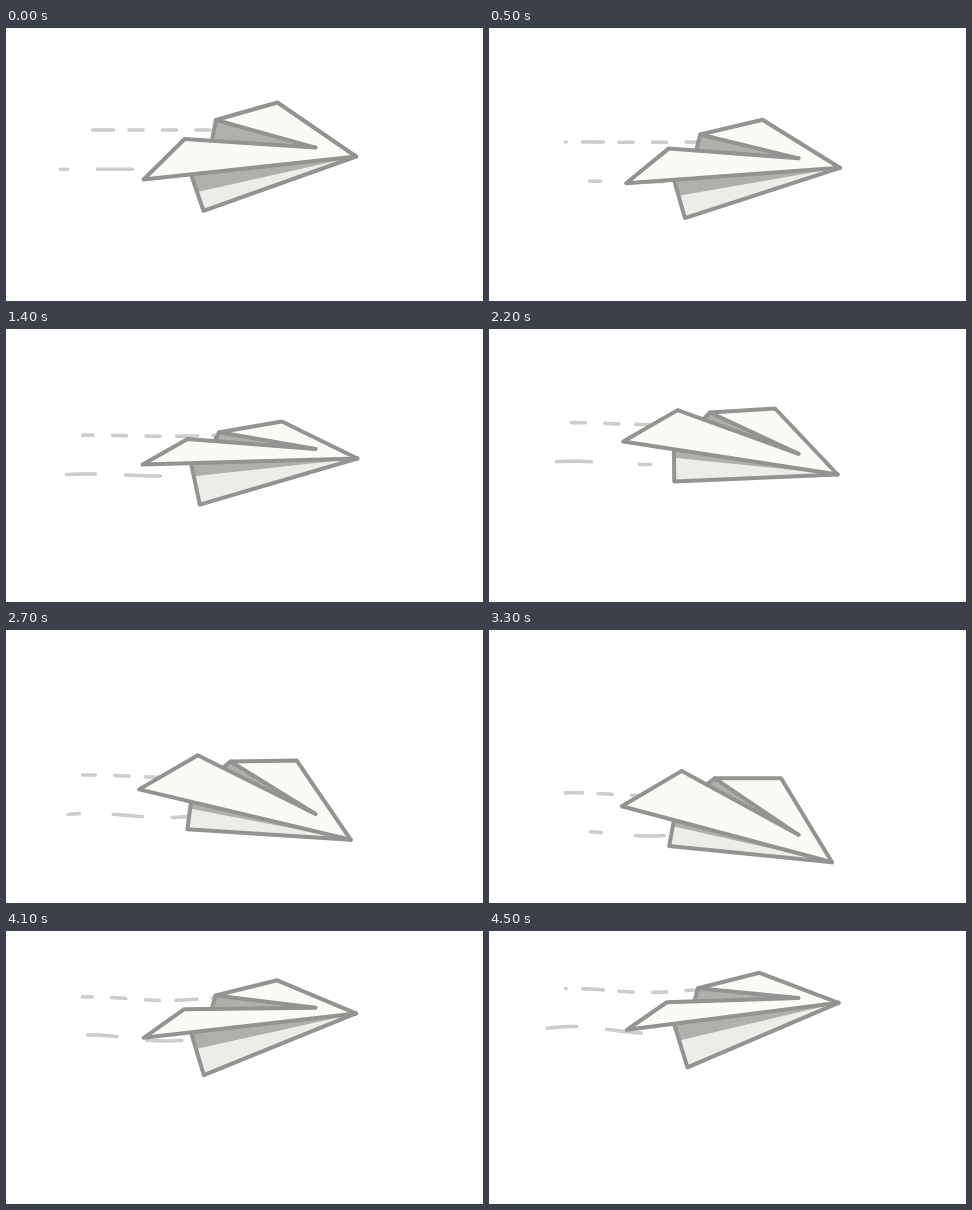
Recreate the animation shown at these times as an HTML page with a canvas. Size 477x273 px, loop 4600 ms.

```html
<!DOCTYPE html>
<html lang="en">
<head>
<meta charset="utf-8">
<title>Paper plane</title>
<style>
html, body { margin: 0; width: 100%; height: 100%; overflow: hidden; background: #fff; }
canvas { display: block; }
</style>
</head>
<body>
<canvas id="stage" width="477" height="273"></canvas>
<script>
const ctx = document.getElementById('stage').getContext('2d');
const LOOP = 4600, STEP = 100;
const PAPER = '#f9fbf6', KEEL = '#ebede9', SHADE = '#adb0ab', INK = '#939391', TRAIL = '#cdcdcc';

// time, nose height, tail and far wing relative to the nose, distance flown
const keys = [
  [0, 128.5, 23, -54, 0],
  [1000, 142.7, 9, -42, 519],
  [1400, 129.5, 6, -37, 720],
  [2000, 131.5, -23, -59, 1040],
  [2200, 145.5, -33, -66, 1146],
  [3100, 240, -56, -84, 1645],
  [3300, 232.2, -56, -84, 1756],
  [3700, 160.5, -1, -57, 1984],
  [4200, 71.8, 27, -30, 2247],
  [4500, 71.8, 27, -30, 2405]
];

const rate = (i, n) => (keys[i + 1][n] - keys[i][n]) / (keys[i + 1][0] - keys[i][0]);

function slope(i, n) {
  if (i === 0) return rate(0, n);
  if (i === keys.length - 1) return rate(i - 1, n);
  const h0 = keys[i][0] - keys[i - 1][0], h1 = keys[i + 1][0] - keys[i][0];
  return (rate(i - 1, n) * h1 + rate(i, n) * h0) / (h0 + h1);
}

// smooth curve through the keys
function poseAt(t) {
  let i = 0;
  while (i < keys.length - 2 && keys[i + 1][0] <= t) i++;
  const a = keys[i], b = keys[i + 1], h = b[0] - a[0], u = (t - a[0]) / h;
  const s = u * u * (3 - 2 * u);
  return a.map((y, n) => y + (b[n] - y) * s
    + h * u * (1 - u) * ((1 - u) * slope(i, n) - u * slope(i + 1, n)));
}

function trace(pts) {
  ctx.beginPath();
  pts.forEach(([x, y]) => ctx.lineTo(x, y));
}
function fill(color, ...pts) {
  trace(pts);
  ctx.fillStyle = color;
  ctx.fill();
}
function line(...pts) {
  trace(pts);
  ctx.stroke();
}

// point on the line p-q at a given x
const onLine = (p, q, x) => [x, p[1] + (q[1] - p[1]) * (x - p[0]) / (q[0] - p[0])];

function streak(x, len, left, height) {
  const a = Math.max(x, left) + 1.5, b = Math.min(x + len, 215) - 1.5;
  if (b <= a) return;
  const pts = [];
  for (let p = a; p < b; p += 4) pts.push([p, height(p)]);
  line(...pts, [b, height(b)]);
}

// repeats the [start, length] dashes every span pixels
function dashes(dashList, span, shift, left, height) {
  for (let x = (shift % span) - span; x < 215; x += span) {
    dashList.forEach(([start, len]) => streak(x + start, len, left, height));
  }
}

const upper = [0, 1, 2, 3].map(i => i ? [33.5 * i + 3, 17] : [0, 24]);
const lower = [[0, 38], [83, 14], [128, 32]];

function drawTrail(t, nose, tail, wing, flown) {
  ctx.strokeStyle = TRAIL;
  ctx.lineWidth = 3.6;
  const y = nose + 0.32 * tail + 0.54 * wing - 4.7;
  const wave = x => 2 * t / LOOP * Math.sin((x - 122) / 76 * Math.PI);
  dashes(upper, 134, 85 - flown + 134 * 20, 75, x => y + wave(x));
  dashes(lower, 187, 90 - flown + 187 * 20, 53, x => y + 39.3 + wave(x) * 1.7);
}

function drawPlane(nose, tail, wing) {
  // each corner shifts with the pitch of the tail and the far wing
  const corner = (x, swing, byTail, byWing, y) =>
    [x + swing * tail, nose + byTail * tail + byWing * wing + y];
  const tip = corner(136.2, 0.06, 1, 0, 0);
  const fold = corner(182.7, -0.18, 0.71, 0.59, -2);
  const end = corner(309.5, 0, 0.18, 0.14, -5.5);
  const farFold = corner(214.4, -0.2, 0.27, 0.87, 4.3);
  const farTip = corner(277.5, -0.26, 0, 1, 0);
  const keel = corner(192.5, 0.22, 0.78, 0.3, 52.6);
  const front = [351.5 - 0.0027 * tail * tail, nose];

  const top = onLine(tip, front, 185);
  const depth = 0.1 + (tail - wing) / 200;
  const shade = top.map((c, n) => c + (keel[n] - c) * depth);
  const hinge = onLine(fold, end, farFold[0] - 5 + tail * 0.05);

  ctx.strokeStyle = INK;
  ctx.lineWidth = 4;
  fill(KEEL, top, keel, front);
  fill(SHADE, top, shade, front);
  line(top, keel, front);

  fill(PAPER, farFold, farTip, front, end);
  fill(SHADE, farFold, end, hinge);
  line(hinge, farFold, farTip, front);
  line(farFold, end);

  fill(PAPER, tip, fold, end, front);
  line(end, fold, tip, front);
}

function frame(now) {
  const t = Math.floor(now % LOOP / STEP) * STEP;
  const [, nose, tail, wing, flown] = poseAt(t);
  ctx.fillStyle = '#fff';
  ctx.fillRect(0, 0, 477, 273);
  ctx.lineCap = ctx.lineJoin = 'round';
  drawTrail(t, nose, tail, wing, flown);
  drawPlane(nose, tail, wing);
}

let start;
function tick(now) {
  if (start === undefined) start = now;
  frame(Math.max(0, now - start));
  requestAnimationFrame(tick);
}
frame(0);
requestAnimationFrame(tick);
</script>
</body>
</html>
```
